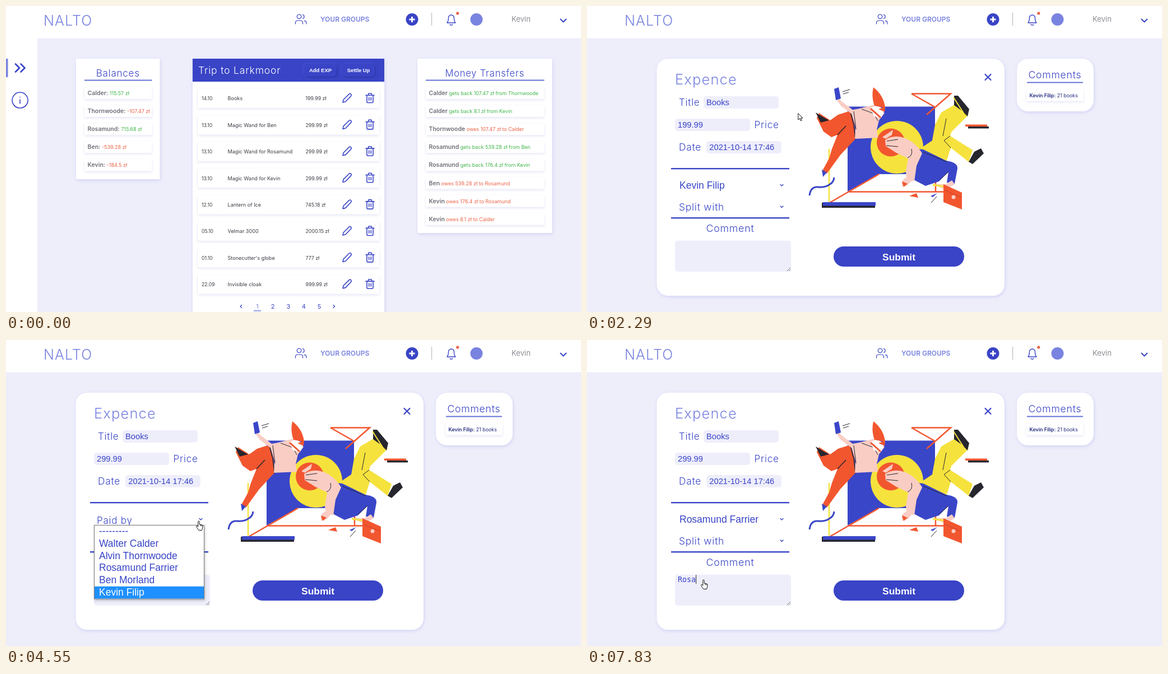
Write an HTML page that moves like this. It is 1026 px wide and 546 px high and loops after 8 s.

```html
<!DOCTYPE html>
<html lang="en">
<head>
<meta charset="utf-8">
<title>Shared expenses</title>
<style>
html, body { margin: 0; width: 100%; height: 100%; overflow: hidden; background: #eeeefb; }
svg { display: block; width: 100vw; height: 100vh; }
text { font-family: Inter, "Open Sans", sans-serif; white-space: pre; }
.wide { font-weight: 300; letter-spacing: .045em; }
.arial { font-family: "Liberation Sans", Arial, sans-serif; }
.mono { font-family: "DejaVu Sans Mono", monospace; }
.card { fill: #fff; filter: drop-shadow(1px 2px 3px rgba(70, 80, 200, .17)); }
.row { fill: #fff; filter: drop-shadow(0 2px 2px rgba(70, 80, 200, .14)); }
.btn { fill: #3944c6; filter: drop-shadow(2px 2px 2px #2a34a5) drop-shadow(-1px -1px 2px #4854d8); }
.menu { fill: #fff; stroke: #777; filter: drop-shadow(1px 2px 2px rgba(0, 0, 0, .25)); }
.icon { fill: none; stroke: #3944c6; stroke-linecap: round; stroke-linejoin: round; }
</style>
</head>
<body>
<svg id="stage" viewBox="0 0 1026 546"></svg>
<script>
const BLUE = '#3944c6', SOFT = '#7983e0', FIELD = '#eeeefb', GREY = '#6f6f78';
const GREEN = '#3fb54a', RED = '#ec6247', YELLOW = '#f6e23d', ORANGE = '#f2562f';
const SKIN = '#f9cdc4', INK = '#26262e', ART = '#3a46c8';

const rect = (x, y, w, h, fill, r = 0, cls = '') =>
  `<rect x="${x}" y="${y}" width="${w}" height="${h}" rx="${r}" ${fill ? `fill="${fill}"` : ''} class="${cls}"/>`;
const circle = (x, y, r, fill) => `<circle cx="${x}" cy="${y}" r="${r}" fill="${fill}"/>`;
const text = (s, x, y, size, fill = BLUE, more = '') =>
  `<text x="${x}" y="${y}" font-size="${size}" fill="${fill}" ${more}>${s}</text>`;
const arial = (s, x, y, size, fill = BLUE, more = '') => text(s, x, y, size, fill, `class="arial" ${more}`);
const label = (s, x, y, size, fill = BLUE, more = '') => text(s, x, y, size, fill, `class="wide" ${more}`);
const icon = (d, x = 0, y = 0, w = 1.6) =>
  `<path class="icon" d="${d}" stroke-width="${w}" transform="translate(${x} ${y})"/>`;
const shape = (d, fill) => `<path d="${d}" fill="${fill}"/>`;
const line = (d, color, w = 2.5) => `<path d="${d}" fill="none" stroke="${color}" stroke-width="${w}"/>`;
const group = (id, body) => `<g id="${id}">${body}</g>`;
const MID = 'text-anchor="middle"', BOLD = 'font-weight="600"', HEAVY = 'font-weight="700"';

function header() {
  return rect(0, 0, 1026, 57.5, '#fff') +
    label('NALTO', 67, 34.5, 25, SOFT) +
    icon('M.5 17v-2q0-4 4-4h5q4 0 4 4v2M7 0a3.800 3.800 0 1 0 .1 0M13.500.3a3.800 3.800 0 0 1 0 7.200M16.500 11.300q3.500.7 3.500 4V17', 516, 15, 1.2) +
    text('YOUR GROUPS', 561, 28.3, 12, SOFT, BOLD) +
    circle(724.5, 24, 11, BLUE) + line('M719.500 24h10M724.500 19v10', '#fff', 2.8) +
    line('M759.500 12v23', '#c6c6cc', 1.5) +
    icon('M1 16q2.500-3 2.500-9a5 5 0 0 1 10 0q0 6 2.500 9zM6 19q2.500 2.400 5 0', 786, 14, 1.4) +
    circle(805.8, 13, 2.6, RED) + circle(839.5, 24, 11, SOFT) +
    text('Kevin', 902, 28.3, 13.4, GREY, 'font-weight="350"') +
    icon('M989.500 23.500l5 5 5-5', 0, 0, 2);
}

function listRow(x, y, w, name, detail, color) {
  return rect(x, y - 14, w, 21, '', 2, 'row') +
    text(`<tspan font-size="10.5" font-weight="600" fill="${GREY}">${name}</tspan> ${detail}`, x + 5.5, y, 9, color);
}

function panel(x, w, h, title, size, rows) {
  return rect(x, 94, w, h, '', 2, 'card') + label(title, x + w / 2, 125.5, size, BLUE, MID) +
    rect(x + 15, 131.5, w - 29, 2, '#6672da') +
    rows.map(([name, detail, color], i) => listRow(x + 15, 159 + 32.1 * i, w - 29, name, detail, color)).join('');
}

function expenseRow([date, title, price], i) {
  const y = 165 + 47.4 * i, base = y + 3.3;
  return rect(342, y - 17, 324, 34, '', 2, 'row') +
    text(date, 349, base, 8.6, '#3c3c46') + text(title, 395.5, base, 9.1, '#3c3c46') +
    text(price + ' zł', 534.5, base, 8.8, '#3c3c46') +
    icon('M1 16l1-4.800L12.500.8q1.600-1 3 .4t.4 3L5.800 14.800z', 600, y - 9) +
    icon('M0 3.300h15M4.500 3.300V1q0-1 1-1h4q1 0 1 1v2.300M2 3.300V15q0 1.500 1.500 1.500h8q1.500 0 1.500-1.500V3.300M5.700 7.300v5M9.300 7.300v5', 642, y - 9);
}

function overview() {
  const balances = [['Calder:', '115.57', 1], ['Thornwoode:', '-107.47'], ['Rosamund:', '715.68', 1],
    ['Ben:', '-539.28'], ['Kevin:', '-184.5']];
  const transfers = [['Calder', '107.47', 'Thornwoode', 1], ['Calder', '8.1', 'Kevin', 1], ['Thornwoode', '107.47', 'Calder'],
    ['Rosamund', '539.28', 'Ben', 1], ['Rosamund', '176.4', 'Kevin', 1], ['Ben', '539.28', 'Rosamund'],
    ['Kevin', '176.4', 'Rosamund'], ['Kevin', '8.1', 'Calder']];
  const expenses = [['14.10', 'Books', '199.99'], ['13.10', 'Magic Wand for Ben', '299.99'],
    ['13.10', 'Magic Wand for Rosamund', '299.99'], ['13.10', 'Magic Wand for Kevin', '299.99'],
    ['12.10', 'Lantern of Ice', '745.18'], ['05.10', 'Velmar 3000', '2000.15'],
    ['01.10', 'Stonecutter\'s globe', '777'], ['22.09', 'Invisible cloak', '999.99']];
  return rect(0, 57, 56, 489, '#fff') + rect(0, 94, 3.5, 33, SOFT) +
    icon('M17 103.500l7 7-7 7M26.500 103.500l7 7-7 7', 0, 0, 2.7) +
    icon('M25 154a14 14 0 1 0 .1 0M25 167v7M25 162.500v.2') +
    panel(125, 149.5, 215, 'Balances', 17, balances.map(([n, v, up]) => [n, v + ' zł', up ? GREEN : RED])) +
    panel(734, 240.5, 311, 'Money Transfers', 16.6, transfers.map(([n, v, who, up]) =>
      [n, up ? `gets back ${v} zł from ${who}` : `owes ${v} zł to ${who}`, up ? GREEN : RED])) +
    rect(333, 94, 342, 470, '', 2, 'card') + rect(333, 94, 342, 41, BLUE) +
    label('Trip to Larkmoor', 343, 120.5, 17.6, '#fff') +
    rect(532, 103.5, 58, 22, '', 6, 'btn') + rect(600, 103.5, 58, 22, '', 6, 'btn') +
    arial('Add EXP', 561, 118, 9.5, '#fff', MID + HEAVY) + arial('Settle Up', 629, 118, 9.3, '#fff', MID + HEAVY) +
    expenses.map(expenseRow).join('') +
    [1, 2, 3, 4, 5].map(n => text(n, 421 + 27.6 * n, 539.5, 11, n > 1 ? BLUE : SOFT, MID)).join('') +
    rect(442, 543, 13, 1.5, SOFT) +
    icon('M420.500 533.500l-2.500 2.500 2.500 2.500M584 533.500l2.500 2.500-2.500 2.500', 0, 0, 1.2);
}

function artwork() {
  return shape('M465 179.500H621V300H521L465 331z', ART) +
    line('M433 351L521 300M465 331.500H640M622 331V305M579 156.500H649L606 194M579 156.500L622 181', ORANGE) +
    circle(553, 252, 47, YELLOW) + circle(542, 243.5, 25, ORANGE) +
    line('M432 255V349', YELLOW) +
    rect(419, 351, 95, 9, INK) + rect(421, 350, 94, 6.5, ART) +
    line('M397 338Q399 322 412 323T432 319Q440 315 441 306', ART, 3) +
    rect(680, 215, 37, 3.5, INK) + rect(675, 211.5, 39, 3.5, ORANGE) +
    // runner on the left
    shape('M470 187L448 194 434 204 414 191 410 200 422 224 436 234 447 230 437 255 432 272 420 294 428 299 452 266 479 237 477 210z', ORANGE) +
    line('M470 189L476 212 479 238M447 230L462 214', INK, 1.5) +
    shape('M408 190L421 198 432 204 417 208z', INK) + shape('M419 292L428 297 421 305z', ART) +
    shape('M470 186L486 183 513 176 531 191 521 204 517 221 519 235 478 237 479 215z', SKIN) +
    shape('M475 186L453 169 449 162 445 167 453 178 474 194z', SKIN) +
    line('M476 188L480 220M490 184L512 192 519 205', INK, 1) +
    shape('M441 148L449 145 453 165 444 168z', ART) +
    line('M456 153L469 149M457 157L467 154', INK, 1) +
    shape('M511 145Q530 160 532 182L513 178Q507 162 511 145z', ORANGE) +
    shape('M506 182Q518 174 531 186L525 199 512 197z', '#fff') + line('M506 183L524 199', ORANGE, 3) +
    shape('M520 184L532 180 531 189z', ORANGE) +
    // diver on the right
    shape('M598 252L616 240 621 212 632 190 656 176 681 194 650 225 648 232 688 257 681 278 649 253 642 276 600 262z', YELLOW) +
    line('M641 201L635 232M648 232L637 240 649 253', INK, 1) +
    shape('M655 160L662 160 682 184 679 197 669 187 655 177z', INK) + line('M654 163L672 191', YELLOW, 2) +
    shape('M681 278L691 260 703 254 708 263 688 282z', INK) +
    shape('M580 254L600 256 641 276Q662 279 661 290L656 317 642 315 645 296 628 313 604 321 585 311 572 298z', ART) +
    line('M600 261L642 278M645 296L628 311', INK, 1) +
    shape('M532 239Q548 228 568 236Q587 244 598 263L588 285 584 313 570 307 569 296 573 272 552 262 533 250z', SKIN) +
    shape('M527 234L546 221 544 230 533 237z', SKIN) +
    line('M535 241L555 238M534 249L555 251M572 271Q582 267 579 255', INK, 1) +
    shape('M562 313Q571 300 582 309L572 320 562 322z', SKIN) + shape('M562 313L572 317 565 323z', ORANGE) +
    shape('M617 318L640 318 651 311 656 318 640 328z', SKIN) + line('M617 319L637 322', YELLOW, 3) +
    shape('M636 318L669 333V363L636 350z', ORANGE) + line('M638 329L667 341', '#c9432c', 1) + circle(654, 341, 3.5, SKIN) +
    shape('M575 339L588 334 591 342z', ORANGE) + shape('M613 339L625 334 617 341z', ART) + line('M614 351L624 340', INK, 1);
}

function form() {
  const arrow = y => icon(`M345 ${y}l2.500 2.500 2.500-2.500`, 0, 0, 1.4);
  return rect(124.5, 94, 620.5, 423, '', 20, 'card') + rect(767, 94, 137, 94, '', 20, 'card') +
    label('Comments', 835, 129, 17.6, BLUE, MID) + rect(785, 135.5, 100, 2, '#6672da') +
    rect(784.5, 149, 101.5, 20.5, '', 2, 'row') +
    text('<tspan font-weight="600">Kevin Filip:</tspan> 21 books', 789.5, 162.7, 8.9, '#252c80') +
    label('Expence', 157, 140, 25.5, SOFT) +
    label('Title', 164, 178, 17) + rect(208, 161, 134, 22, FIELD, 5) + arial('Books', 213, 177.2, 14.7) +
    rect(157, 201, 134, 22, FIELD, 5) + label('Price', 298.5, 218, 17) +
    label('Date', 164, 258, 17.3) + rect(213, 241, 134, 22, FIELD, 5) + arial('2021-10-14 17:46', 218.3, 257.3, 14.7) +
    rect(150, 289, 211, 2.4, BLUE) + rect(150, 377, 211, 2.4, BLUE) + arrow(318.5) + arrow(357) +
    label('Split with', 164, 365.3, 17.4) + label('Comment', 255.5, 403.3, 17.8, BLUE, MID) +
    rect(157, 418.5, 207, 55.5, FIELD, 5) + line('M357 473L363 467M360.500 473L363 470.500', '#777', 1) +
    rect(440, 429, 233, 36, BLUE, 18) + arial('Submit', 556.5, 453.6, 17.4, '#fff', MID + HEAVY) +
    group('art', artwork() + icon('M710.500 122l10 10M720.500 122l-10 10', 0, 0, 2.2)) +
    group('live', '');
}

const PEOPLE = ['---------', 'Walter Calder', 'Alvin Thornwoode', 'Rosamund Farrier', 'Ben Morland', 'Kevin Filip'];
const ROW = 21.7, TOP = 331.2;

function menu(y) {
  const active = y < TOP ? 5 : Math.floor((y - TOP) / ROW);
  return rect(157.5, 330.5, 196, 131.5, '', 0, 'menu') + PEOPLE.map((name, i) =>
    (i === active ? rect(158, TOP + ROW * i, 195, ROW, '#1e90ff') : '') +
    arial(name, 166, 347.2 + ROW * i, 17.5, i === active ? '#fff' : BLUE)).join('');
}

const isOpen = t => t >= 4470 && t < 5820;

// Parts of the form that depend on the time and the pointer
function live(t, x, y) {
  const selected = t >= 3000 && t < 3540;
  let s = arial(t < 3540 ? '199.99' : '299.99', 162, 217.2, 14.7);
  if (selected) s += rect(162, 204, 8.2, 17, '#1e90ff') + arial('1', 162, 217.2, 14.7, '#fff');
  if (t >= 3540 && t < 4070) s += rect(170, 204, 1, 17, BLUE);
  if (inside(PRICE, x, y)) s += shape('M278 210l2.800-3.500 2.800 3.500zM278 214l2.800 3.500 2.800-3.500z', '#444');
  s += isOpen(t) ? label('Paid by', 162, 327.7, 17) + menu(y)
    : arial(PEOPLE[t < 4470 ? 5 : 3], 165, 326, 17.5);
  const typed = [7300, 7500, 7700, 7830].filter(k => t >= k).length;
  s += text('Rosa'.slice(0, typed), 162, 431.5, 13.33, BLUE, 'class="mono"');
  if (t >= 6560 && (t < 7100 || typed)) s += rect(162 + 8.03 * typed, 419, 1, 16, INK);
  return s;
}

// Pointer path: time, x, y
const PATH = [[190, 988, 524], [800, 590, 170], [940, 609, 165], [1010, 610, 164], [1210, 611, 165], [1410, 611, 165],
  [1540, 615, 165], [1900, 615, 165], [2640, 176, 214], [2840, 150, 213], [3100, 170, 214], [3230, 170, 214],
  [3470, 361, 340], [3740, 361, 340], [4070, 344, 323], [4740, 344, 323], [5090, 256, 388], [5560, 258, 404],
  [5620, 258, 407], [5820, 258, 407], [6170, 244, 393], [6300, 222, 426], [6630, 222, 426], [6700, 224, 433], [6770, 208, 428]];
const PENCIL = [600, 155, 614, 174], PRICE = [157, 201, 291, 223], PAYER = [157, 312, 353, 330], NOTE = [157, 418, 364, 474];
const inside = ([l, t, r, b], x, y) => x >= l && x <= r && y >= t && y <= b;

function pointer(t) {
  const i = PATH.findIndex(k => k[0] > t);
  if (i < 0) return PATH[PATH.length - 1].slice(1);
  if (!i) return PATH[0].slice(1);
  const [a, x, y] = PATH[i - 1], [b, u, v] = PATH[i];
  const p = (t - a) / (b - a), e = p * p * (3 - 2 * p);
  return [x + (u - x) * e, y + (v - y) * e];
}

const outline = 'fill="#fff" stroke="#111" stroke-linejoin="round"';
const $ = id => document.getElementById(id);
$('stage').innerHTML = rect(0, 0, 1026, 546, FIELD) + header() + group('overview', overview()) + group('form', form()) +
  group('cursor', `<path id="arrow" ${outline} d="M0 0V11.500L2.700 9 4.500 13.200 6.400 12.400 4.600 8.400H8.200z"/>` +
    `<path id="hand" ${outline} d="M-1.200 1.200a1.200 1.200 0 0 1 2.400 0V6l4.300 1q1.600.4 1.500 2l-.5 3.800L5.500 16.500H0L-4 10.800Q-5 9.200-4 8.600T-2 9.400L-1.200 10.200zM3 6.500v2.500M5 7v2.300"/>`);

const show = (id, on) => { $(id).style.display = on ? '' : 'none'; };

function frame(now) {
  const t = now % 8000, first = t < 1710, [x, y] = pointer(t);
  show('overview', first);
  show('form', !first);
  show('art', t >= 1900);
  if (!first) $('live').innerHTML = live(t, x, y);
  const links = first ? [PENCIL] : isOpen(t) ? [PAYER] : [PRICE, PAYER, NOTE];
  const hand = links.some(r => inside(r, x, y));
  show('cursor', t >= 190);
  show('hand', hand);
  show('arrow', !hand);
  $('cursor').setAttribute('transform', `translate(${x.toFixed(1)} ${y.toFixed(1)})`);
  requestAnimationFrame(frame);
}
requestAnimationFrame(frame);
</script>
</body>
</html>
```
